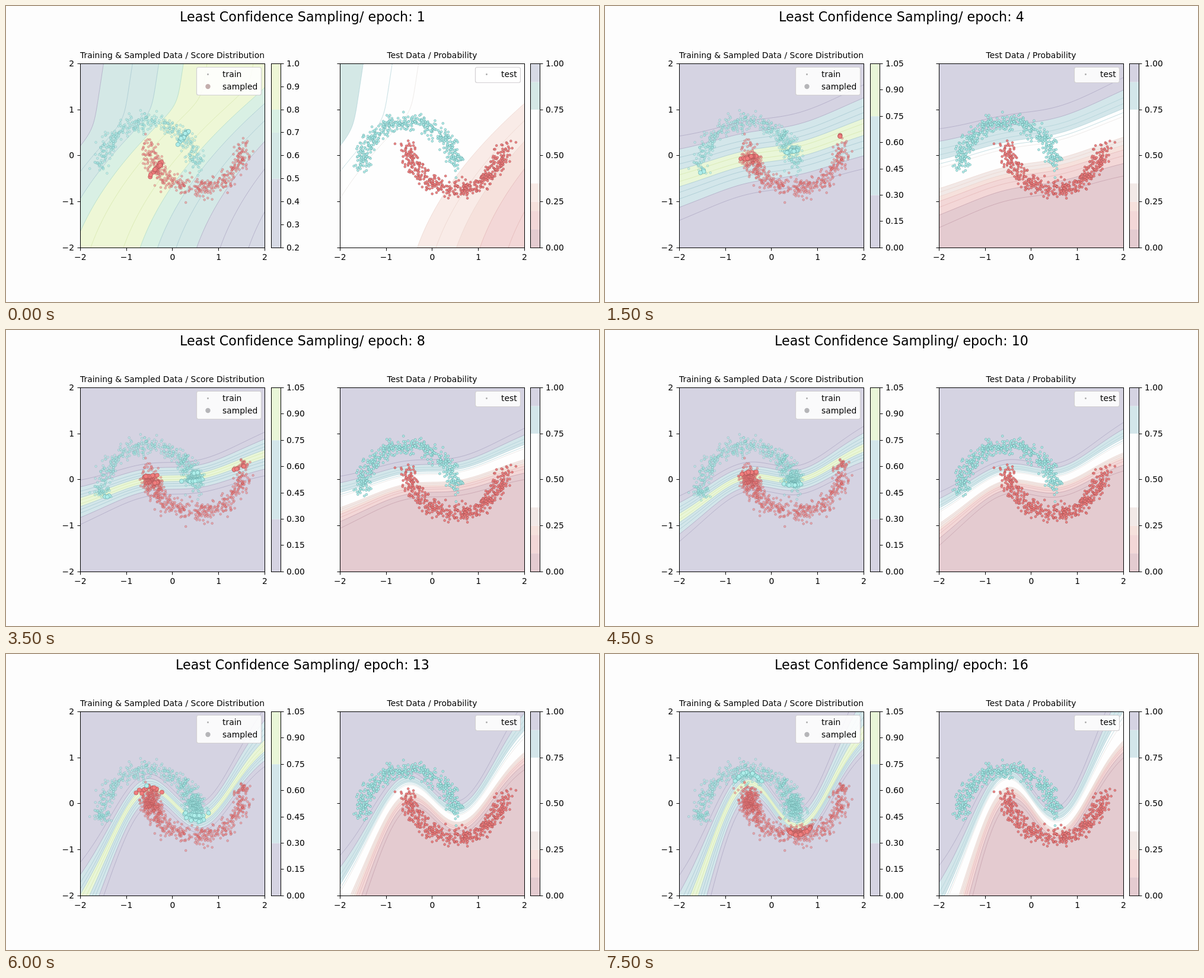
Write an HTML page with a canvas that moves like this. It is 1000x500 px and loops after 8 s.

```html
<!DOCTYPE html>
<html lang="en">
<head>
<meta charset="utf-8">
<title>Least Confidence Sampling</title>
<style>
html, body { margin: 0; width: 100%; height: 100%; overflow: hidden; background: #fdfdfd; }
canvas { display: block; }
</style>
</head>
<body>
<canvas id="stage" width="1000" height="500"></canvas>
<script>
const ctx = document.getElementById('stage').getContext('2d');
const FONT = '"DejaVu Sans", Verdana, sans-serif';
const EPOCHS = 16, STEP = 500;
const LEFT = 125, TOP = 97, SIZE = 311, SHIFT = 438;
const RIGHT = LEFT + SIZE, BOTTOM = TOP + SIZE;
const X = x => LEFT + .3 + (x + 2) * SIZE / 4;
const Y = y => BOTTOM + .3 - (y + 2) * SIZE / 4;

const THEMES = [
  { purple: '#d7dae5', teal: '#d4e8e6', green: '#d9f0e4', yellow: '#eef7d6', sampled: '#c3aeac' },
  { purple: '#d5d3e2', teal: '#d3e6ea', yellow: '#e9f6d8', sampled: '#b5b5b8' }
];
const LINES = { purple: '#a9a4c0', teal: '#a3c5ce', green: '#abd8c4', yellow: '#d5e5aa' };
const TEAL = ['#aeeeea', '#5f9f9f'], RED = ['#f07d7d', '#a04f50'];

// The decision boundary starts as a tilted line, flattens, then bends into an S.
function model(epoch) {
  const start = Math.exp(1 - epoch);
  const bend = .15 + 2.5 / (1 + Math.exp((11.9 - epoch) / 1.25));
  const slope = .17 + .39 * bend + 1.1 * start;
  const width = .11 + 1.5 * Math.exp(-epoch / 2);
  return {
    epoch,
    center: x => .03 + .1 * start + slope * x + (.02 - .075 * bend) * x * x
      - bend * x * Math.exp(-x * x / 1.25),
    spread(x, above) {
      const flare = above ? .05 : x < 0 ? .1 : 0;
      return width + (.05 + flare * bend * bend) * x * x / 4;
    }
  };
}

function confidence(m, p) {
  const d = p.y - m.center(p.x);
  return Math.abs(d / m.spread(p.x, d > 0));
}

let seed = 20;
function random() {
  seed = seed + 0x6D2B79F5 | 0;
  let t = Math.imul(seed ^ seed >>> 15, 1 | seed);
  t = t + Math.imul(t ^ t >>> 7, 61 | t) ^ t;
  return ((t ^ t >>> 14) >>> 0) / 4294967296;
}
const gauss = s => s * Math.sqrt(-2 * Math.log(1 - random())) * Math.cos(2 * Math.PI * random());

function moons(count, noise) {
  return Array.from({ length: count }, (_, i) => {
    const t = Math.PI * random(), sign = i % 2 ? -1 : 1;
    return {
      x: sign * 1.03 * (Math.cos(t) - .5) + gauss(noise),
      y: sign * (Math.sin(t) - .27) + gauss(noise),
      ink: i % 2 ? RED : TEAL
    };
  });
}

const train = moons(840, .1), test = moons(900, .09);
const models = [], samples = [];
let pool = moons(4000, .1);
for (let e = 1; e <= EPOCHS; e++) {
  const m = models[e] = model(e);
  pool.sort((a, b) => confidence(m, a) - confidence(m, b));
  samples[e] = pool.splice(0, 52);
}

// First epoch: contours climb to the right until they bend upright at a limit.
function firstContourX(h, z) {
  const climb = -1.42 - 1.77 * z + .35 * h + .125 * h * h;
  const limit = 1.1 - 2.5 * z + .15 * (h - 3);
  return -Math.log(Math.exp(-8 * climb) + Math.exp(-8 * limit)) / 8;
}

function contour(m, p) {
  const path = new Path2D(), z = Math.log(p / (1 - p));
  for (let v = -2; v < 2.03; v += .04) {
    if (m.epoch === 1) path.lineTo(X(firstContourX(v + 2, z)), Y(v));
    else path.lineTo(X(v), Y(m.center(v) + z * m.spread(v, z > 0)));
  }
  return path;
}

function fillBeyond(m, p, color) {
  const area = contour(m, p), high = p > .5;
  if (m.epoch === 1) {
    const side = high ? LEFT - 200 : RIGHT + 400;
    area.lineTo(side, TOP);
    area.lineTo(side, BOTTOM);
  } else {
    const side = high ? TOP - 200 : BOTTOM + 400;
    area.lineTo(RIGHT + 2, side);
    area.lineTo(LEFT, side);
  }
  ctx.fillStyle = color;
  ctx.fill(area);
}

function strokeLevel(m, p, color) {
  ctx.strokeStyle = color;
  ctx.lineWidth = .7;
  ctx.stroke(contour(m, p));
}

function dots(points, radius, alpha) {
  ctx.globalAlpha = alpha;
  ctx.lineWidth = .6;
  for (const p of points) {
    ctx.beginPath();
    ctx.arc(X(p.x), Y(p.y), radius, 0, 7);
    ctx.fillStyle = p.ink[0];
    ctx.fill();
    ctx.strokeStyle = p.ink[1];
    ctx.stroke();
  }
  ctx.globalAlpha = 1;
}

function text(s, x, y, align = 'left', size = 13.89) {
  ctx.font = `${size}px ${FONT}`;
  ctx.letterSpacing = '0.01px'; // keeps "fi" from joining
  ctx.textAlign = align;
  ctx.fillStyle = '#000';
  ctx.fillText(s, x, y);
}

function frame(x, width) {
  ctx.strokeStyle = '#000';
  ctx.lineWidth = 1;
  ctx.strokeRect(x + .5, TOP + .5, width, SIZE);
}

function tick(x, y, dx, dy) {
  ctx.beginPath();
  ctx.moveTo(Math.floor(x) + .5, Math.floor(y) + .5);
  ctx.lineTo(Math.floor(x) + .5 + dx, Math.floor(y) + .5 + dy);
  ctx.stroke();
}

function axes(title, withLabels) {
  frame(LEFT, SIZE);
  for (let v = -2; v <= 2; v++) {
    const label = String(v).replace('-', '−');
    tick(X(v), BOTTOM, 0, 5);
    tick(LEFT, Y(v), -5, 0);
    text(label, X(v), 429, 'center');
    if (withLabels) text(label, 115, Math.floor(Y(v)) + 5, 'right');
  }
  text(title, (LEFT + RIGHT) / 2, 88, 'center');
}

// Bands run upwards as [upper value, colour].
function colorbar(x, min, max, step, digits, bands) {
  const at = v => BOTTOM + .3 - (v - min) / (max - min) * SIZE;
  let from = min;
  for (const [to, color] of bands) {
    ctx.fillStyle = color;
    ctx.fillRect(x, at(to), 16, at(from) - at(to));
    from = to;
  }
  frame(x, 16);
  for (let v = min; v < max + .01; v += step) {
    tick(x + 16, at(v), 5, 0);
    text(v.toFixed(digits), x + 26, Math.floor(at(v)) + 5);
  }
}

function legend(x, width, height, entries) {
  ctx.beginPath();
  ctx.roundRect(x, 103.5, width, height, 3);
  ctx.fillStyle = 'rgba(255,255,255,.88)';
  ctx.fill();
  ctx.strokeStyle = '#d2d0d2';
  ctx.lineWidth = 1.2;
  ctx.stroke();
  entries.forEach(([label, radius, color], i) => {
    ctx.beginPath();
    ctx.arc(x + 19, 115.5 + 20.5 * i, radius, 0, 7);
    ctx.fillStyle = color;
    ctx.fill();
    text(label, x + 43.5, 120 + 21 * i);
  });
}

function inPanel(color, paint) {
  ctx.save();
  ctx.beginPath();
  ctx.rect(LEFT, TOP, SIZE + 1, SIZE + 1);
  ctx.clip();
  ctx.fillStyle = color;
  ctx.fillRect(LEFT, TOP, SIZE + 1, SIZE + 1);
  paint();
  ctx.restore();
}

function scorePanel(m, colors) {
  const first = m.epoch === 1, step = first ? .1 : .15;
  const bands = first
    ? [[.5, 'purple'], [.7, 'teal'], [.8, 'green'], [1, 'yellow']]
    : [[.3, 'purple'], [.75, 'teal'], [1.05, 'yellow']];
  inPanel(colors.yellow, () => {
    for (const [s, name] of bands.slice(0, -1).reverse())
      for (const p of [s / 2, 1 - s / 2]) fillBeyond(m, p, colors[name]);
    for (let s = first ? .3 : .15; s < .95; s += step) {
      const name = bands.find(b => s < b[0] + .01)[1];
      for (const p of [s / 2, 1 - s / 2]) strokeLevel(m, p, LINES[name]);
    }
    dots(train, 1.9, .5);
    for (let e = 1; e < m.epoch; e++) dots(samples[e], 1.9, .5);
    dots(samples[m.epoch], 3.6, 1);
  });
  axes('Training & Sampled Data / Score Distribution', true);
  colorbar(447, first ? .2 : 0, first ? 1 : 1.05, step, first ? 1 : 2,
    bands.map(([s, name]) => [s, colors[name]]));
  legend(321.5, 109, 47, [['train', 1.4, '#aaa'], ['sampled', 4.2, colors.sampled]]);
}

function levelColor(p) {
  if (p < .12) return '#c39daa';
  if (p < .22) return '#e3b5b5';
  if (p < .37) return '#ead2cb';
  if (p < .67) return '#e6e1df';
  return p < .87 ? '#acd0d6' : '#a9a4c0';
}

function probabilityPanel(m, colors) {
  const white = '#fefefe', pale = m.epoch === 1 ? '#f9ebe7' : '#f2e9e7';
  const low = [[.1, '#e4cbd0'], [.2, '#f3d7d7'], [.25, '#f6e1dc'], [.35, pale]];
  ctx.save();
  ctx.translate(SHIFT, 0);
  inPanel(white, () => {
    for (const [p, color] of [...low].reverse()) fillBeyond(m, p, color);
    fillBeyond(m, .75, colors.teal);
    fillBeyond(m, .9, colors.purple);
    for (let p = .05; p < .36; p += .05)
      for (const q of [p, 1 - p]) strokeLevel(m, q, levelColor(q));
    dots(test, 1.9, .92);
  });
  axes('Test Data / Probability', false);
  ctx.restore();
  colorbar(884, 0, 1, .25, 2, [...low, [.75, white], [.9, colors.teal], [1, colors.purple]]);
  legend(791.5, 76, 26, [['test', 1.4, '#aaa']]);
}

function draw(epoch) {
  const colors = THEMES[epoch === 1 ? 0 : 1];
  ctx.fillStyle = '#fdfdfd';
  ctx.fillRect(0, 0, 1000, 500);
  text(`Least Confidence Sampling/ epoch: ${epoch}`, 500, 26, 'center', 22.22);
  scorePanel(models[epoch], colors);
  probabilityPanel(models[epoch], colors);
}

let shown = 0;
function play() {
  const epoch = Math.floor(performance.now() / STEP) % EPOCHS + 1;
  if (epoch !== shown) draw(shown = epoch);
  requestAnimationFrame(play);
}
play();
</script>
</body>
</html>
```
